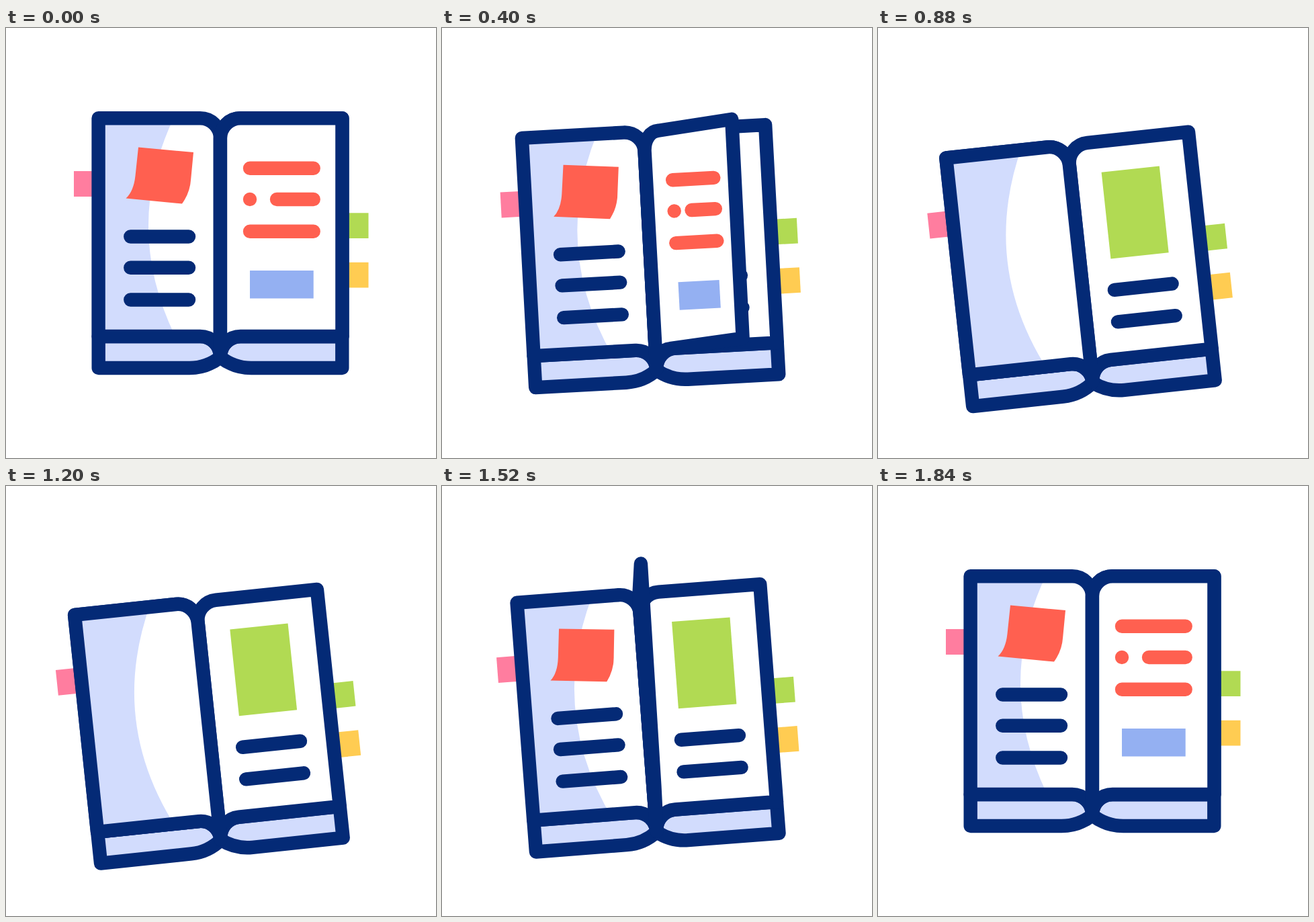
Animation of 640 by 640 pixels, one loop 2.24 s. Source, as an HTML page:

```html
<!DOCTYPE html>
<html lang="en">
<head>
<meta charset="utf-8">
<title>Notebook</title>
<style>
  html, body { margin: 0; width: 100%; height: 100%; overflow: hidden; background: #fff; }
  svg { display: block; width: 100vw; height: 100vh; }
  .ink { stroke: #042a76; stroke-width: 20.4; stroke-linecap: round; stroke-linejoin: round; }
  .red { stroke: #ff6050; stroke-width: 20.4; stroke-linecap: round; }
  .none { fill: none; }
  .white { fill: #fff; }
  .pale { fill: #d2dcfd; }
  .green { fill: #b1da53; }
</style>
</head>
<body>
<svg viewBox="0 0 640 640">
  <defs>
    <path id="shade" class="pale" d="M120 80H279Q145 294 279 508H120Z"/>
    <path id="cover" class="ink pale" d="M319 489A30 30 0 0 0 289 459H137.7V506H273A74 74 0 0 0 319 490Z"/>
    <clipPath id="leftClip"><path id="leftShape"/></clipPath>
    <clipPath id="leafClip"><path id="leafShape"/></clipPath>
  </defs>
  <g id="book">
    <rect x="101" y="213" width="34" height="38" fill="#ff7d9f"/>
    <rect x="505" y="275.3" width="34.5" height="37.7" class="green"/>
    <rect x="505" y="348.8" width="34.5" height="37.7" fill="#ffcc52"/>
    <use href="#cover"/>
    <use href="#cover" transform="translate(638) scale(-1 1)"/>

    <path id="leftFill" class="white"/>
    <use href="#shade" clip-path="url(#leftClip)"/>
    <path fill="#ff6050" d="M197 177.5L279 185L275.2 225Q274 245 262 261.5L178.5 253.5Q190 243 192.5 220Z"/>
    <path class="ink none" d="M185.3 310.5H272M185.3 356.7H272M185.3 404.5H272"/>
    <path id="leftLine" class="ink none"/>

    <path id="rightFill" class="white"/>
    <rect x="365.3" y="180" width="86.7" height="129.5" class="green"/>
    <path class="ink none" d="M365.7 356.2H452M365.7 404H452"/>
    <path id="rightLine" class="ink none"/>

    <path id="leafFill" class="white"/>
    <g clip-path="url(#leafClip)">
      <g id="front">
        <path id="rows" class="red none"/>
        <path id="box" fill="#94b0f2"/>
      </g>
      <use id="back" href="#shade"/>
    </g>
    <path id="leafLine" class="ink none"/>
  </g>
</svg>
<script>
const LOOP = 2240, STEP = 40, SPINE = 319;
const $ = id => document.getElementById(id);
const clamp = v => Math.min(1, Math.max(0, v));
const span = (t, from, to) => clamp((t - from) / (to - from));

function bezier(x1, y1, x2, y2) {
  const at = (s, a, b) => 3 * (1 - s) ** 2 * s * a + 3 * (1 - s) * s * s * b + s ** 3;
  return u => {
    if (u <= 0 || u >= 1) return clamp(u);
    let lo = 0, hi = 1;
    for (let i = 0; i < 30; i++) {
      const s = (lo + hi) / 2;
      if (at(s, x1, x2) < u) lo = s; else hi = s;
    }
    return at(lo, y1, y2);
  };
}
const leave = bezier(.28, 0, .05, 1);
const turnBack = bezier(.75, 0, .8, .8);
const riseBack = bezier(.75, 0, .8, 1);
const swing = u => u < .5 ? (2 * u) ** 3.7 / 2 : 1 - (2 - 2 * u) ** 3.7 / 2;

// c runs from 1 (flat on the right) to -1 (flat on the left)
function pagePath(c) {
  const w = Math.abs(c);
  const lift = 46 * (1 - w) ** 1.1;
  const edge = SPINE + 181.4 * c, bend = SPINE + 30 * c;
  const foot = edge - 5 * (1 - w);
  const arc = sweep => `A${30 * w} 30 0 0 ${c > 0 ? sweep : 1 - sweep} `;
  return `M${SPINE} 489V164${arc(1)}${bend} 134.2L${edge} ${134.2 - lift}` +
    `L${foot} ${459 - .85 * lift}L${bend} 459${arc(0)}${SPINE} 489Z`;
}

function setPage(name, c, clip) {
  const d = pagePath(c);
  $(name + 'Fill').setAttribute('d', d);
  $(name + 'Line').setAttribute('d', d);
  if (clip) $(name + 'Shape').setAttribute('d', d);
}

function drawFront(c) {
  const mid = 331 + 79.5 * c, k = Math.max(0, 1 - (1 - c) * 1.3);
  const x = v => mid + (v - 410.5) * k;
  const row = (a, b, y) => `M${x(a)} ${y}L${x(b)} ${y}`;
  $('rows').setAttribute('d', row(363, 457.7, 208.7) + row(363, 363.01, 255) +
    row(403, 457.7, 255) + row(363, 457.7, 302.7));
  $('box').setAttribute('d', `M${x(363)} 361H${x(457.7)}V402.5H${x(363)}Z`);
}

function draw(time) {
  const t = Math.floor((time % LOOP) / STEP) * STEP;
  const out = leave(span(t, 200, 1000)), home = span(t, 1000, 1840);
  const tilt = 6.2 * (out - turnBack(home));
  const drop = 38.2 * (out - riseBack(home));
  const c = 1 - 2 * (swing(span(t, 196, 776)) - swing(span(t, 1229, 1805)));
  $('book').setAttribute('transform',
    `translate(${.1 * tilt} ${drop}) rotate(${-tilt} ${SPINE} 489)`);
  setPage('leaf', c, true);
  $('front').style.display = c > 0 ? '' : 'none';
  $('back').style.display = c < 0 ? '' : 'none';
  if (c > 0) drawFront(c);
  else $('back').setAttribute('transform', `translate(${SPINE * (1 + c)}) scale(${-c} 1)`);
}

setPage('left', -1, true);
setPage('right', 1);
const start = performance.now();
function tick() {
  draw(performance.now() - start);
  requestAnimationFrame(tick);
}
tick();
</script>
</body>
</html>
```
